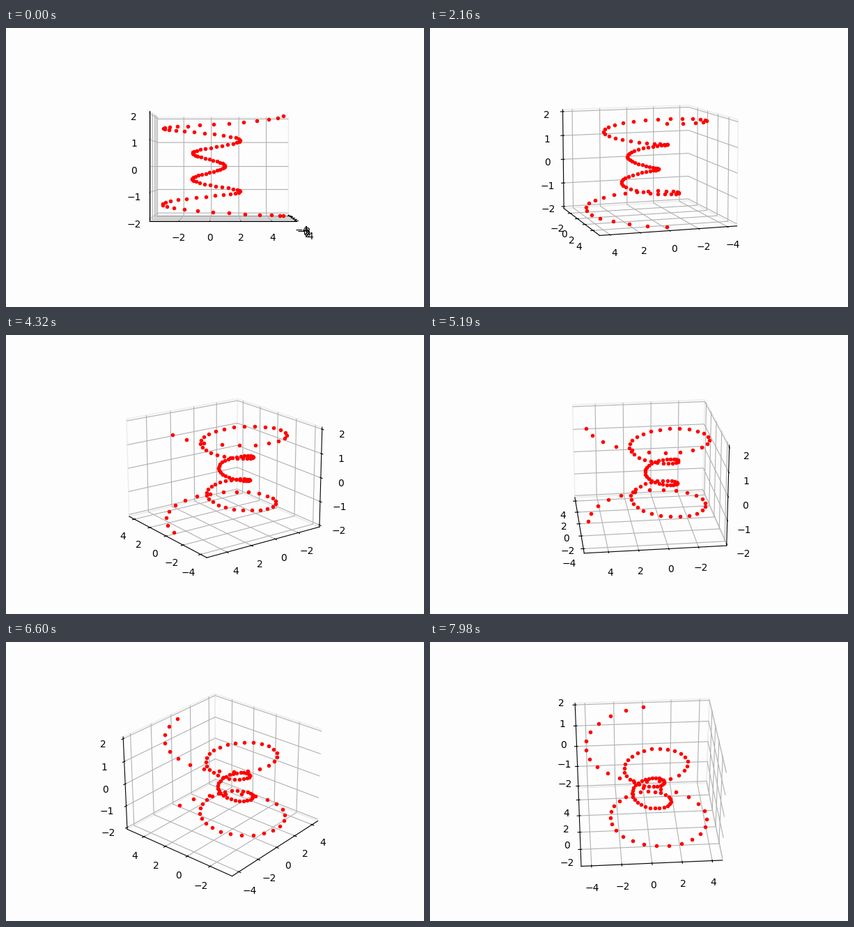
A matplotlib script that plays this animation: 600x400 px, repeating every 8000 ms.

```python
import numpy as np
import matplotlib.pyplot as plt
from matplotlib.animation import FuncAnimation

FRAMES = 267
INTERVAL = 30
BACKGROUND = "#fdfdfd"
PANE_EDGE = "#ececec"

fig = plt.figure(figsize=(6, 4), dpi=100, facecolor=BACKGROUND)
ax = fig.add_subplot(projection="3d", facecolor=BACKGROUND)

# Spiral whose radius grows away from the middle
theta = np.linspace(-4 * np.pi, 4 * np.pi, 100)
z = np.linspace(-2, 2, 100)
r = z**2 + 1
ax.plot(r * np.sin(theta), r * np.cos(theta), z, "r.")

# Clear panes with only a faint outline
for axis in (ax.xaxis, ax.yaxis, ax.zaxis):
    axis.pane.set_fill(False)
    axis.pane.set_alpha(1)
    axis.pane.set_edgecolor(PANE_EDGE)


def turn(i):
    """Orbit one degree per step while rising an eighth of a degree."""
    ax.view_init(elev=i / 8, azim=i)
    return ax.lines


anim = FuncAnimation(fig, turn, frames=FRAMES, interval=INTERVAL,
                     init_func=lambda: turn(0), repeat=True)
plt.show()
```
